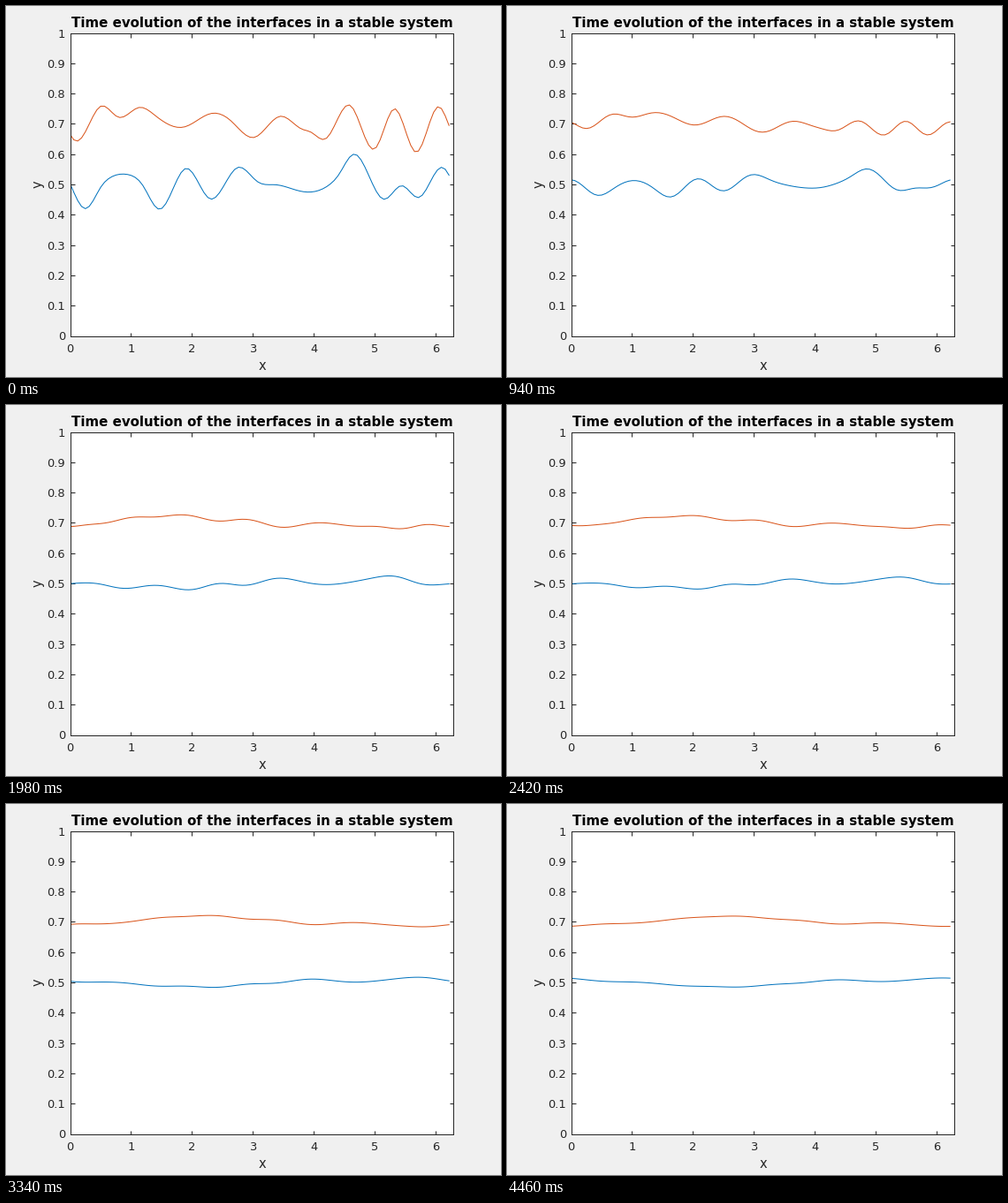
A matplotlib script that plays this animation: 560x420 px, repeating every 4500 ms.

```python
import numpy as np
import matplotlib.pyplot as plt
from matplotlib.animation import FuncAnimation

W, H, DPI = 560, 420, 80
PX = 72 / DPI              # one pixel in points
TAU = 2 * np.pi
INK = "#262626"

N = 100                    # samples along x
SPEED = 0.0144             # drift to the right per step
RATE, SLOWING = 0.012, 80  # initial damping per step, and how it eases off
GAP = 0.2                  # distance between the two interfaces

plt.rcParams["font.family"] = "DejaVu Sans"

grid = np.arange(N) * TAU / N


def periodic_curve(points):
    """Sample a periodic cubic spline through (x, y) points on the grid."""
    px, py = np.array(points).T
    h = np.diff(np.append(px, TAU))
    back = np.roll(h, 1)
    slope = (np.roll(py, -1) - py) / h
    system = (np.diag(2 * (h + back)) + np.roll(np.diag(h), 1, axis=1)
              + np.roll(np.diag(back), -1, axis=1))
    m = np.linalg.solve(system, 6 * (slope - np.roll(slope, 1)))
    i = np.searchsorted(px, grid, "right") - 1
    j = (i + 1) % len(px)
    b = grid - px[i]
    a = h[i] - b
    return ((m[i] * a**3 + m[j] * b**3) / (6 * h[i])
            + (py[i] / h[i] - m[i] * h[i] / 6) * a
            + (py[j] / h[i] - m[j] * h[i] / 6) * b)


# Crests, troughs and shoulders of the starting shapes
upper = np.fft.rfft(periodic_curve([
    (0, .665), (.12, .643), (.5, .758), (.79, .722), (1.13, .754), (1.4, .727),
    (1.88, .69), (2.31, .734), (2.64, .71), (3.02, .655), (3.45, .725),
    (3.8, .683), (3.96, .672), (4.2, .651), (4.6, .761), (5.0, .617),
    (5.33, .75), (5.68, .606), (6.05, .757)]))
lower = np.fft.rfft(periodic_curve([
    (0, .503), (.25, .42), (.5, .49), (.68, .525), (.94, .533), (1.2, .495),
    (1.47, .418), (1.9, .553), (2.3, .452), (2.75, .556), (3.07, .51),
    (3.37, .499), (3.8, .477), (4.25, .498), (4.42, .535), (4.66, .6),
    (5.15, .451), (5.44, .496), (5.73, .457), (6.12, .556)]))

k = np.arange(len(upper))
coupling = np.exp(-GAP * k)


def interfaces(step):
    """Drift and damp every mode; in-phase ripples die faster than opposed."""
    damping = k * RATE * SLOWING * np.log1p(step / SLOWING)
    drift = np.exp(-1j * k * SPEED * step)
    same = (upper + lower) / 2 * np.exp(-damping * (1 + coupling)) * drift
    opposed = (upper - lower) / 2 * np.exp(-damping * (1 - coupling)) * drift
    return np.fft.irfft(same - opposed, N), np.fft.irfft(same + opposed, N)


fig = plt.figure(figsize=(W / DPI, H / DPI), dpi=DPI, facecolor="#f0f0f0")
ax = fig.add_axes([72.5 / W, 46.5 / H, 433 / W, 343 / H])
ax.set_xlim(0, TAU)
ax.set_ylim(0, 1)
ax.set_xticks(range(7))
yticks = np.arange(11) / 10
ax.set_yticks(yticks, [f"{v:g}" for v in yticks])
ax.tick_params(direction="in", top=True, right=True, length=4.5 * PX,
               width=PX, color=INK, labelcolor=INK, labelsize=13 * PX)
ax.tick_params(axis="x", pad=8 * PX)
ax.tick_params(axis="y", pad=5.5 * PX)
for spine in ax.spines.values():
    spine.set(color=INK, linewidth=PX)


def label(x, y, text, size, **style):
    fig.text(x / W, 1 - y / H, text, fontsize=size * PX, ha="center", **style)


label(289.5, 24, "Time evolution of the interfaces in a stable system", 15,
      va="baseline", weight="bold", color="black")
label(290, 412, "x", 14.67, va="baseline", color=INK)
label(36, 202, "y", 14.67, va="center", rotation=90, color=INK)

low_line, = ax.plot(grid, interfaces(0)[0], color="#0072BD", lw=PX)
top_line, = ax.plot(grid, interfaces(0)[1], color="#D95319", lw=PX)


def draw(i):
    # 500 ms hold, then one step every 40 ms
    step = 0 if i < 25 else 1 + (i - 25) // 2
    low, top = interfaces(step)
    low_line.set_ydata(low)
    top_line.set_ydata(top)
    return low_line, top_line


anim = FuncAnimation(fig, draw, frames=225, interval=20, repeat=True,
                     repeat_delay=0)
plt.show()
```
